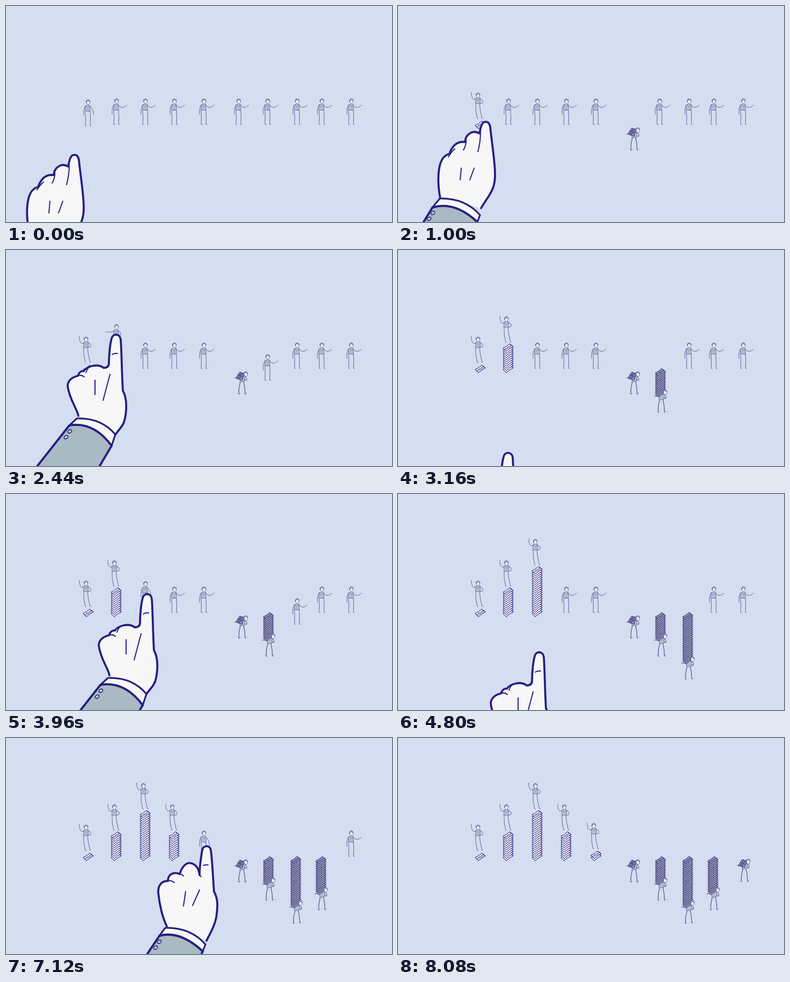
Animation, 720 px wide and 405 px high, one loop 8640 ms. Source, as an HTML page with a canvas:

```html
<!DOCTYPE html>
<html lang="en">
<head>
<meta charset="utf-8">
<title>Credit and debt</title>
<style>
html, body { margin: 0; width: 100%; height: 100%; overflow: hidden; background: #d5ddf0; }
canvas { display: block; width: 720px; height: 405px; }
</style>
</head>
<body>
<canvas id="stage" width="720" height="405"></canvas>
<script>
const ctx = document.getElementById('stage').getContext('2d');
const LOOP = 8640, STEP = 40, GROUND = 222;
const INK = '#26207f', THIN = '#575a94', DARK = '#3a367c', WHITE = '#f7f7f8', GREY = '#a9bac4', VEST = '#b3bccd';

// Lifted people: place, start and end of the lift, final height
const lifted = [
  { x: 152, t0: 240, t1: 420, rise: 11 },
  { x: 205, t0: 2250, t1: 2520, rise: 49 },
  { x: 259, t0: 3910, t1: 4360, rise: 89 },
  { x: 313, t0: 5480, t1: 5700, rise: 49 },
  { x: 368, t0: 7130, t1: 7320, rise: 14 }
];

// Burdened people: place, moment of the drop, final head position
const burdened = [
  { x: 433, t0: 300, hx: 447, hy: 233 },
  { x: 487, t0: 2340, hx: 498, hy: 267 },
  { x: 542, t0: 3860, hx: 549, hy: 310 },
  { x: 588, t0: 5400, hx: 596, hy: 285 },
  { x: 643, t0: 7220, hx: 653, hy: 232 }
];

// Each visit of the hand: shape and fingertip keys [time, x, y]
const visits = [
  { hand: 'low', keys: [[0, 127, 279], [240, 160, 208], [420, 163, 194], [780, 163, 194], [1000, 163, 217], [1460, 163, 425]] },
  { hand: 'fist', keys: [[1760, 78, 420], [2250, 203, 194], [2440, 205, 158], [2520, 205, 148], [2700, 205, 148], [3240, 205, 420]] },
  { hand: 'fist', keys: [[3400, 136, 420], [3880, 262, 196], [3960, 263, 187], [4360, 263, 110], [4470, 263, 110], [5020, 263, 420]] },
  { hand: 'open', keys: [[5060, 190, 420], [5480, 316, 196], [5700, 317, 150], [5820, 317, 150], [6360, 317, 420]] },
  { hand: 'open', keys: [[6680, 248, 420], [7120, 374, 202], [7320, 374, 187], [7420, 374, 187], [7880, 374, 430]] }
];

// Hands are drawn relative to the fingertip
const P = d => new Path2D(d);
const hands = {
  low: {
    shape: P('M-84 144C-89 120-89 95-84 78C-80 66-74 62-67 60C-62 46-54 36-38 38C-37 24-24 14-11 22C-9 10-7 3-3 1C4-2 8 3 9 10C12 40 18 75 18 100C18 120 12 130 6 140C-2 152-6 158-8 162'),
    creases: P('M-69 66Q-64 57-57 51M-41 53Q-35 44-36 30M-14 56Q-9 38-9 18M-45 87L-47 109M-21 87L-29 109'),
    cuff: P('M-85 144Q-38 143-10 175L-15 188Q-58 148-99 161Z'),
    sleeve: P('M-285 470L-99 161Q-58 148-15 188L-144 470'),
    button: [-98, 171]
  },
  fist: {
    shape: P('M-70 153C-72 140-87 122-90 97C-90 86-80 80-71 78C-69 72-65 68-60 69C-54 60-34 54-23 63C-18 63-13 61-13 54C-13 40-11 18-8 8C-6-2 8-2 9 10C11 40 11 76 13 106C21 120 21 145 15 165C11 175 4 180 0 187'),
    creases: P('M-71 78Q-65 75-59 80M-50 61Q-54 66-56 72M-39 86L-39 113M-11 75L-24 124M-7 38Q-2 35 3 36'),
    cuff: P('M-73 158Q-28 156-1 188L-8 209Q-42 163-87 171Z'),
    sleeve: P('M-329 480L-87 171Q-42 163-8 209L-167 480'),
    button: [-86, 182]
  },
  open: {
    shape: P('M-74 151C-82 135-88 110-90 88C-91 74-83 66-72 66C-72 54-62 48-50 53C-46 40-38 30-28 33C-18 36-14 46-13 55C-13 40-10 20-8 8C-6-1 6-2 8 8C11 30 12 60 14 86C22 100 21 115 18 135C14 155 6 165 0 178'),
    creases: P('M-72 66Q-66 64-60 69M-50 53Q-46 53-43 57M-13 55L-10 58M-39 86L-43 113M-13 83L-26 112M-6 37Q-1 35 3 36'),
    cuff: P('M-77 154Q-30 153-2 185L-7 198Q-50 158-88 169Z'),
    sleeve: P('M-294 480L-88 169Q-50 158-7 198L-136 480'),
    button: [-88, 180]
  }
};

const arms = {
  point: P('M-4-36Q-8-32-7-19M5-36Q9-31 13-32T20-36'),
  down: P('M-4-36Q-8-32-7-19M5-36Q10-33 12-20'),
  left: P('M-4-35Q-9-33-18-34M5-36Q11-32 8-27L4-27')
};
const stand = {
  vest: P('M-4-37Q0-39 5-37L5-27L-4-27Z'),
  collar: P('M-2-37L1-33L3-37'),
  legs: P('M-4-27Q-3-12-4 0L-2 0M0-27L5-27Q6-12 5 0L7 0')
};
const proud = {
  vest: P('M-7-38Q-3-40 2-38L1-28L-7-28Z'),
  collar: P('M-5-38L-2-34L0-38'),
  legs: P('M-7-28Q-8-14-4 0L-3 0M0-28Q1-14 5 0L6-1'),
  arms: P('M-7-36Q-14-35-14-41Q-16-44-15-49M2-37Q9-33 5-29L1-28')
};
// Positions relative to the head
const bent = {
  vest: P('M-11 5Q-5 2-1 4L-2 13L-10 14Z'),
  limbs: P('M-10 14Q-13 25-13 37L-11 37M-4 13Q-1 24-1 37L1 36M0 5Q4 8 1 12L-4 7M-12 7L-20 7')
};
const load = {
  box: P('M-8 4L-1-7L8-4L3 8Z'),
  stripes: P('M-5 5L2-6M-2 6L5-5M-4-2L5 2')
};
const note = P('M-9 1Q-2-2 3-7L10-2Q3 1-3 7Z');
const face = P('M-3-1C-3-5 4-5 3.5 0C3 6-2 6-3-1Z');
const hair = P('M-3.5 0C-5-6 4-7 4-1Q1-4-1-3Q-3-2-3.5 0Z');

const clamp = v => Math.max(0, Math.min(1, v));
const ramp = (t, a, b) => clamp((t - a) / (b - a));

function at(x, y, draw) {
  ctx.save();
  ctx.translate(x, y);
  draw();
  ctx.restore();
}

function shape(path, line, width, fill) {
  if (fill) { ctx.fillStyle = fill; ctx.fill(path); }
  ctx.strokeStyle = line;
  ctx.lineWidth = width;
  ctx.stroke(path);
}

function head(x, y) {
  at(x, y, () => {
    shape(face, THIN, 0.8, '#e9eef8');
    shape(hair, THIN, 0.7, '#9499bb');
  });
}

function figure(x, feet, pose) {
  const up = pose === 'up', body = up ? proud : stand;
  at(x, feet, () => {
    shape(body.legs, THIN, 0.9);
    shape(body.vest, THIN, 0.7, VEST);
    shape(body.collar, THIN, 0.8, '#e3e9f5');
    shape(up ? body.arms : arms[pose], THIN, 0.9);
    head(up ? -3 : 1, -43);
  });
}

function label() {
  ctx.rotate(-0.55);
  ctx.fillStyle = INK;
  ctx.font = 'bold 4.5px "Liberation Sans", Arial, sans-serif';
  ctx.textAlign = 'center';
  ctx.fillText('CREDIT', 0.2, 1.6);
}

function stack(x, bottom, top, pitch, line, fill) {
  const n = Math.max(0, Math.round((bottom - top) / pitch));
  for (let i = 0; i <= n; i++) {
    at(x, bottom - i * pitch, () => {
      shape(note, line, 1.05, fill);
      if (i === n) label();
    });
  }
}

function drawLifted(p, t) {
  const u = ramp(t, p.t0, p.t1);
  const feet = GROUND + (p.x === 152 && u < 1 ? 2 : 0) - p.rise * u;
  let pose = 'point';
  if (u === 1) pose = 'up';
  else if (u > 0.4) pose = 'left';
  else if (t >= p.t0 - 250) pose = 'down';
  if (p.rise * u > 8) {
    const top = 223 - Math.max(0, p.rise * u - 11);
    stack(p.x + (p.rise < 20 ? 1 : 0), 223, top, 4, INK, WHITE);
  }
  figure(p.x, feet, pose);
}

function drawBurdened(p, t) {
  const drop = ramp(t, p.t0, p.t0 + 100);
  if (t < p.t0 + 180) return figure(p.x, GROUND + 22 * drop, 'point');
  const y = 233 + (p.hy - 233) * ramp(t, p.t0 + 180, p.t0 + 380);
  at(p.hx, y, () => {
    shape(bent.limbs, DARK, 1);
    shape(bent.vest, THIN, 0.8, VEST);
  });
  if (p.hy < 240) {
    at(p.hx - 10, y + 3, () => {
      shape(load.box, DARK, 1.1, '#8f93ae');
      shape(load.stripes, DARK, 1.3);
    });
  } else {
    stack(p.hx - 9, y + 2, 231, 3.6, DARK, '#9da1b8');
  }
  head(p.hx, y);
}

function drawHand(t) {
  const visit = visits.find(v => t >= v.keys[0][0] && t < v.keys[v.keys.length - 1][0]);
  if (!visit) return;
  const i = visit.keys.findIndex(k => k[0] > t);
  const [a, b] = [visit.keys[i - 1], visit.keys[i]];
  const u = ramp(t, a[0], b[0]);
  const hand = hands[visit.hand];
  at(a[1] + (b[1] - a[1]) * u, a[2] + (b[2] - a[2]) * u, () => {
    shape(hand.shape, INK, 3.8, WHITE);
    shape(hand.creases, INK, 2);
    shape(hand.cuff, INK, 3.2, WHITE);
    shape(hand.sleeve, INK, 4, GREY);
    const [x, y] = hand.button;
    for (const k of [0, 1]) {
      ctx.beginPath();
      ctx.ellipse(x - 7 * k, y + 11 * k, 4, 2.8, -0.7, 0, 7);
      ctx.fillStyle = '#c3cfda';
      ctx.fill();
      ctx.lineWidth = 1.5;
      ctx.stroke();
    }
  });
}

function render(now) {
  const t = Math.floor((now % LOOP) / STEP) * STEP;
  ctx.fillStyle = '#d5ddf0';
  ctx.fillRect(0, 0, 720, 405);
  ctx.lineCap = ctx.lineJoin = 'round';
  lifted.forEach(p => drawLifted(p, t));
  burdened.forEach(p => drawBurdened(p, t));
  drawHand(t);
}

const start = performance.now();
function tick() {
  render(performance.now() - start);
  requestAnimationFrame(tick);
}
tick();
</script>
</body>
</html>
```
